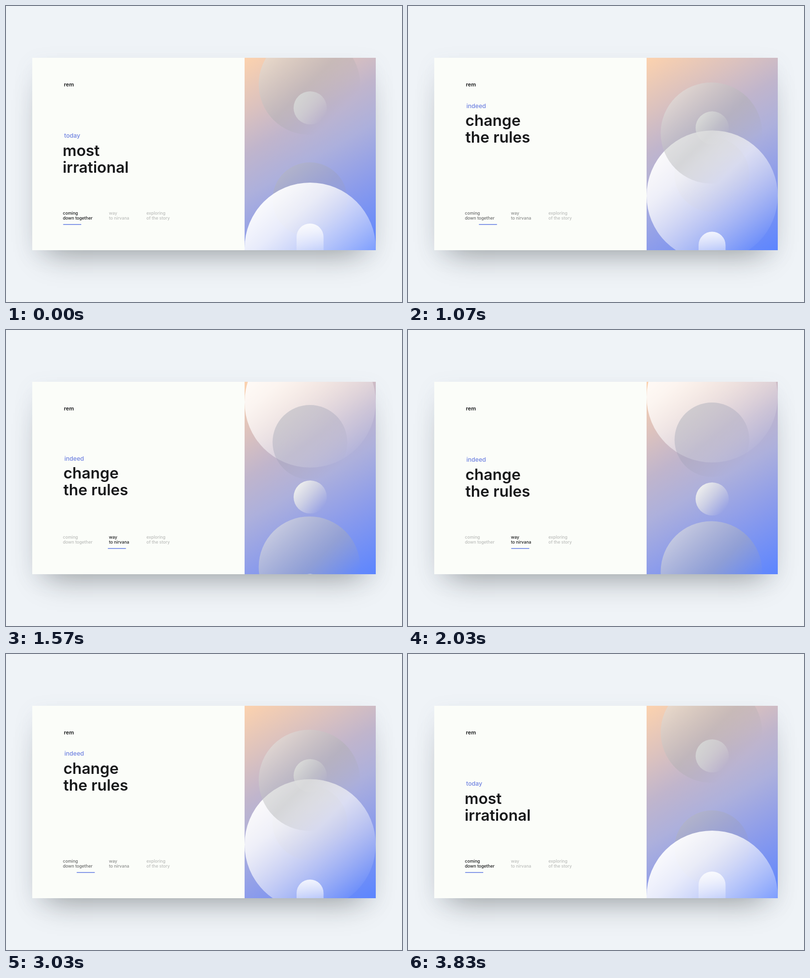
Write an HTML page that moves like this. It is 800 px wide and 600 px high and loops after 3.91 s.

```html
<!DOCTYPE html>
<html lang="en">
<head>
<meta charset="utf-8">
<title>Slide transition</title>
<style>
html, body { margin: 0; width: 100%; height: 100%; overflow: hidden; background: #eff3f7; }
.card { position: absolute; left: 53px; top: 105px; width: 694px; height: 390px; background: #fbfdf9;
  box-shadow: 0 34px 60px -30px rgba(25, 32, 32, .42), 0 12px 40px rgba(100, 120, 140, .08); }
svg { position: absolute; left: 0; top: 0; font-family: Inter, sans-serif; fill: #17181a; }
.title { font-size: 31px; font-weight: 600; }
.label { font-size: 12.1px; font-weight: 500; fill: #6f82e0; }
.nav { font-size: 8.6px; font-weight: 500; }
</style>
</head>
<body>
<div class="card"></div>
<svg width="800" height="600" viewBox="0 0 800 600">
  <defs>
    <linearGradient id="sky" gradientUnits="userSpaceOnUse" x1="497" y1="96.5" x2="732" y2="503.5">
      <stop offset="0" stop-color="#fcd2ae"/>
      <stop offset=".2" stop-color="#dcc2be"/>
      <stop offset=".36" stop-color="#c0b5cc"/>
      <stop offset=".52" stop-color="#adb0dc"/>
      <stop offset=".72" stop-color="#8c9ceb"/>
      <stop offset="1" stop-color="#5c85ff"/>
    </linearGradient>
    <linearGradient id="white" x1=".15" y1=".1" x2=".85" y2=".9">
      <stop offset="0" stop-color="#fff" stop-opacity=".95"/>
      <stop offset=".25" stop-color="#fff" stop-opacity=".8"/>
      <stop offset="1" stop-color="#fff" stop-opacity=".02"/>
    </linearGradient>
    <linearGradient id="grey" x1=".15" y1=".15" x2=".85" y2=".85">
      <stop offset="0" stop-color="#dfe0dd" stop-opacity=".58"/>
      <stop offset=".5" stop-color="#acaeaf" stop-opacity=".42"/>
      <stop offset=".9" stop-color="#a0a2a8" stop-opacity="0"/>
    </linearGradient>
    <linearGradient id="dusk" x1=".15" y1=".1" x2=".8" y2=".9">
      <stop offset="0" stop-color="#b4b6be" stop-opacity=".55"/>
      <stop offset=".5" stop-color="#9a9cb4" stop-opacity=".32"/>
      <stop offset="1" stop-color="#9a9cb4" stop-opacity="0"/>
    </linearGradient>
    <linearGradient id="pearl" x1=".1" y1=".15" x2=".9" y2=".8">
      <stop offset="0" stop-color="#f2f3f0" stop-opacity=".95"/>
      <stop offset=".45" stop-color="#e6e7e8" stop-opacity=".62"/>
      <stop offset="1" stop-color="#e0e0e6" stop-opacity="0"/>
    </linearGradient>
    <linearGradient id="glow" gradientUnits="userSpaceOnUse" x1="0" y1="441" x2="0" y2="514">
      <stop offset="0" stop-color="#fff" stop-opacity=".85"/>
      <stop offset="1" stop-color="#fff" stop-opacity="0"/>
    </linearGradient>
    <clipPath id="panel"><rect x="482" y="105" width="265" height="390"/></clipPath>
    <g id="pair">
      <circle id="moon" cx="614" r="75.5" fill="url(#dusk)"/>
      <circle id="ball" cx="614.5" r="33.5" fill="url(#pearl)"/>
    </g>
  </defs>

  <g clip-path="url(#panel)">
    <rect x="482" y="105" width="265" height="390" fill="url(#sky)"/>
    <use id="back" href="#pair"/>
    <circle id="sun" cx="614.5" r="132.5" fill="url(#white)"/>
    <use id="front" href="#pair"/>
    <circle id="disc" cx="613" r="102.5" fill="url(#grey)"/>
    <rect id="pill" x="587" y="441" width="54.5" height="130" rx="27.25" fill="url(#glow)"/>
  </g>

  <text x="117" y="163" font-size="10.8" font-weight="600">rem</text>
  <g id="first">
    <text class="label" x="117.5" y="267">today</text>
    <text class="title"><tspan x="114.5" y="303.5">most</tspan><tspan x="114.5" y="337.5">irrational</tspan></text>
  </g>
  <g id="second">
    <text class="label" x="118" y="267">indeed</text>
    <text class="title"><tspan x="116" y="303.5">change</tspan><tspan x="116" y="337.5">the rules</tspan></text>
  </g>

  <text class="nav" id="nav1"><tspan x="115" y="422.5">coming</tspan><tspan x="115" y="433.3">down together</tspan></text>
  <text class="nav" id="nav2"><tspan x="208" y="422.5">way</tspan><tspan x="208" y="433.3">to nirvana</tspan></text>
  <text class="nav" opacity=".28"><tspan x="283.7" y="422.5">exploring</tspan><tspan x="283.7" y="433.3">of the story</tspan></text>
  <rect id="line" y="442" width="36.5" height="1.6" fill="#6c84e4"/>
</svg>
<script>
const LOOP = 3910, MOVE = 933, GO = 733, RETURN = 2433, DROP = 86;
const set = (id, name, value) => document.getElementById(id).setAttribute(name, value);
const clamp = v => Math.max(0, Math.min(1, v));
const mix = (a, b, k) => a + (b - a) * k;
const ease = v => { const u = clamp(v); return u * u * (3 - 2 * u); };

function draw(t) {
  const p = ease((t - GO) / MOVE) - ease((t - RETURN) / MOVE);

  set('sun', 'cy', mix(490.5, 136, p));
  set('disc', 'cy', mix(158.5, 490, p));
  set('ball', 'cy', mix(206.5, 342.5, p));
  set('moon', 'cy', mix(392.5, 222.5, p));
  set('pill', 'transform', `translate(0 ${55 * p})`);

  // the pair passes from behind the large circle to its front
  const swap = clamp((p - 0.3) / 0.4);
  set('back', 'opacity', 1 - swap);
  set('front', 'opacity', swap);

  set('first', 'transform', `translate(0 ${DROP * p})`);
  set('first', 'opacity', clamp(1 - p / 0.18));
  set('second', 'transform', `translate(0 ${DROP * (p - 1)})`);
  set('second', 'opacity', clamp((p - 0.08) / 0.18));

  set('nav1', 'opacity', mix(1, 0.28, clamp(p / 0.6)));
  set('nav2', 'opacity', mix(0.28, 1, p));
  set('line', 'x', mix(115.5, 208.5, p));
}

const start = performance.now();
function tick() {
  draw((performance.now() - start) % LOOP);
  requestAnimationFrame(tick);
}
tick();
</script>
</body>
</html>
```
